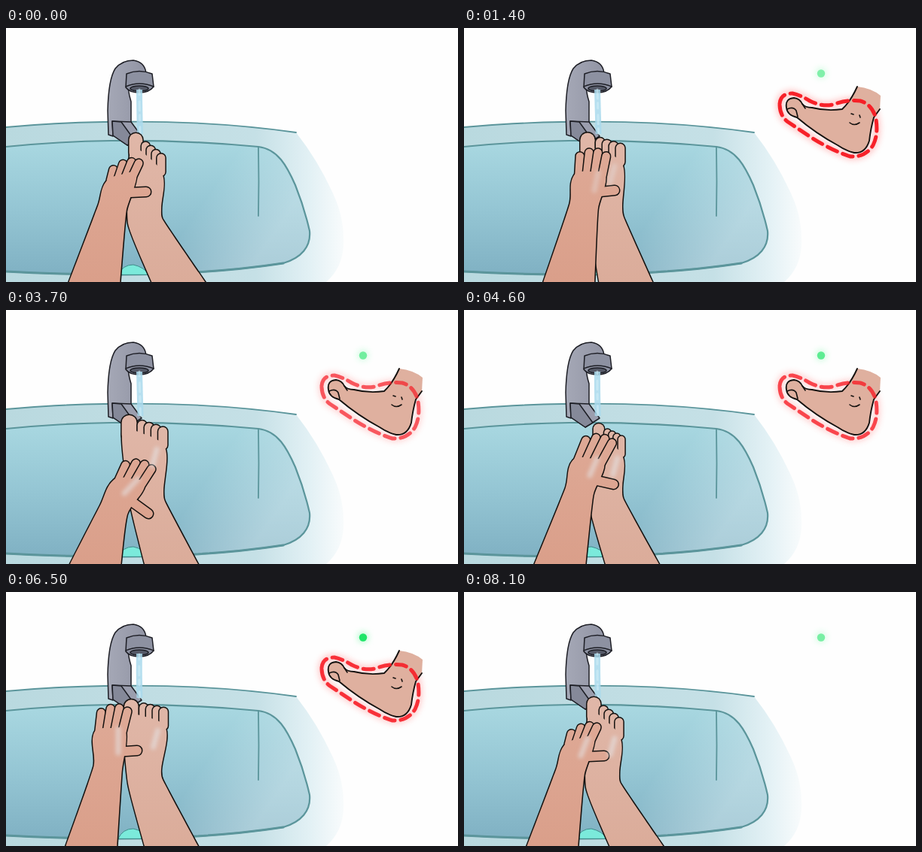
Animation, 600 px wide and 338 px high, one loop 8200 ms. Source, as an HTML page:

```html
<!DOCTYPE html>
<html lang="en">
<head>
<meta charset="utf-8">
<title>Foot washing</title>
<style>
  html, body { margin: 0; width: 100%; height: 100%; overflow: hidden; background: #fefefe; }
  svg { display: block; width: 100%; height: 100%; }
  path { stroke-linecap: round; stroke-linejoin: round; }
  .line { fill: none; stroke: #14110f; }
  .steel { stroke: #1d1e25; stroke-width: 1.5; }
  .edge { fill: none; stroke: #5b959b; }
</style>
</head>
<body>
<svg viewBox="0 0 600 338" preserveAspectRatio="none">
  <defs>
    <linearGradient id="water" x1="0" y1="0" x2="0" y2="1">
      <stop offset="0" stop-color="#a9d8e1"/>
      <stop offset=".5" stop-color="#95c6d4"/>
      <stop offset="1" stop-color="#80b1c3"/>
    </linearGradient>
    <linearGradient id="shine" x1="0" y1="0" x2="1" y2=".3">
      <stop offset=".72" stop-color="#eaf5f8" stop-opacity="0"/>
      <stop offset="1" stop-color="#eaf5f8" stop-opacity=".4"/>
    </linearGradient>
    <linearGradient id="rim" gradientUnits="userSpaceOnUse" x1="0" y1="0" x2="460" y2="0">
      <stop offset="0" stop-color="#b9d9df"/>
      <stop offset=".72" stop-color="#c5e0e6"/>
      <stop offset=".88" stop-color="#e3f1f5"/>
      <stop offset="1" stop-color="#fefefe"/>
    </linearGradient>
    <linearGradient id="handSkin" gradientUnits="userSpaceOnUse" x1="0" y1="130" x2="0" y2="338">
      <stop offset="0" stop-color="#dfab98"/>
      <stop offset="1" stop-color="#da9f8a"/>
    </linearGradient>
    <linearGradient id="footSkin" gradientUnits="userSpaceOnUse" x1="0" y1="140" x2="0" y2="338">
      <stop offset="0" stop-color="#e0b7a8"/>
      <stop offset="1" stop-color="#dbac9a"/>
    </linearGradient>
    <linearGradient id="steel" x1="0" y1="0" x2="1" y2="0">
      <stop offset="0" stop-color="#a5a8b6"/>
      <stop offset="1" stop-color="#9194a4"/>
    </linearGradient>
    <filter id="glow" x="-50%" y="-50%" width="200%" height="200%"><feGaussianBlur stdDeviation="4"/></filter>
    <filter id="foam" x="-100%" y="-100%" width="300%" height="300%"><feGaussianBlur stdDeviation="2.5"/></filter>
    <path id="bowl" d="M0 158Q70 151 140 150Q240 149 335 158C361 161 373 184 384 209Q396 239 403 270C405 291 392 306 368 313Q270 328 150 328Q70 328 0 324"/>
    <path id="ring" d="M419 101Q420 87 436 87Q446 89 459 97Q475 105 489 102Q509 95 526 97Q543 102 547 122Q550 142 543 156Q533 172 513 171Q488 163 460 145L430 125Q419 117 419 101Z"/>
  </defs>

  <g id="sink">
    <path fill="url(#rim)" d="M0 132Q65 126 130 125Q265 122 385 139Q414 176 434 220Q450 254 448 290Q446 320 425 338H0Z"/>
    <path class="edge" stroke-width="1.8" d="M0 132Q65 126 130 125Q265 122 385 139"/>
    <use href="#bowl" fill="url(#water)"/>
    <use href="#bowl" fill="url(#shine)"/>
    <use href="#bowl" class="edge" stroke-width="2.2"/>
    <path class="edge" stroke-width="3" d="M368 313Q270 328 150 328Q70 328 0 324"/>
    <path class="edge" stroke-width="1.8" d="M335 158Q336 205 335 250"/>
    <path fill="#7beadb" stroke="#3f8c8b" d="M149 328Q155 315 169 315Q183 318 190 328Z"/>
  </g>

  <g id="tap">
    <path class="steel" fill="url(#steel)" d="M136 142L135 110Q136 68 145 54Q154 43 169 43Q184 45 186 60L163 72Q161 82 166 98V126L142 144Z"/>
    <path class="steel" fill="#9b9eae" d="M141 124L166 125L180 144L161 156L142 143Z"/>
    <path class="steel" fill="#858999" d="M141 124L153 125L171 150L161 156L142 143Z"/>
    <path class="steel" fill="#8d91a1" d="M160 61Q177 54 194 61L196 78Q190 86 177 86Q164 86 159 79Z"/>
    <path class="steel" fill="none" d="M159 78Q177 70 196 78"/>
    <ellipse class="steel" cx="177" cy="80.5" rx="12" ry="3.5" fill="#565a68"/>
  </g>
  <path id="stream" fill="none" stroke="#a9d9ec" stroke-width="8" opacity=".85" style="stroke-linecap:butt"/>
  <path id="ripple" fill="none" stroke="#d3eef8" stroke-width="3" stroke-dasharray="7 9 12 6" opacity=".55"/>

  <g id="foot"></g>
  <g id="hand"></g>
  <path id="soap" fill="none" stroke="#e6eef3" stroke-width="7" filter="url(#foam)"/>

  <g id="icon">
    <use id="halo" href="#ring" fill="none" stroke="#ff5a5a" stroke-width="8" filter="url(#glow)"/>
    <path fill="#dfb09f" d="M428 106Q426 94 438 93Q446 94 449 101Q453 106 462 106Q482 111 502 108Q513 98 522 78Q541 80 553 90L552 108L544 119Q540 133 538 150Q533 167 518 166Q506 163 496 156Q468 141 442 119Q429 116 428 106Z"/>
    <path class="line" stroke-width="1.9" d="M522 78Q513 98 502 108Q482 111 462 106Q453 106 449 101Q446 94 438 93Q426 94 428 106Q429 116 442 119Q468 141 496 156Q506 163 518 166Q533 167 538 150Q540 133 544 119L552 108"/>
    <path class="line" stroke-width="1.6" d="M429 108Q437 104 441 110L443 118M449 101L453 107M512 126Q518 131 525 126M514 114L517 115M525 116L526 119"/>
    <use id="dashes" href="#ring" fill="none" stroke="#f71b24" stroke-width="5" stroke-dasharray="14 8" style="stroke-linecap:butt"/>
  </g>
  <g id="dot">
    <circle cx="474" cy="60" r="7" fill="#62f59a" opacity=".5" filter="url(#glow)"/>
    <circle cx="474" cy="60.5" r="5.2" fill="#1fe568"/>
  </g>
</svg>
<script>
const LOOP = 8200, STEP = 100, FLOOR = 342;
const el = id => document.getElementById(id);
const clamp = v => Math.max(0, Math.min(1, v));
const ramp = (t, a, b) => clamp((t - a) / (b - a));
const ease = u => (1 - Math.cos(Math.PI * u)) / 2;
const wave = (t, period, peak) => Math.cos((t - peak) / period * 2 * Math.PI);
const mix = (a, b, u) => Array.isArray(a) ? a.map((v, i) => mix(v, b[i], u)) : a + (b - a) * u;
const add = (p, d, k = 1) => [p[0] + d[0] * k, p[1] + d[1] * k];
const along = a => [Math.cos(a), Math.sin(a)];
const lean = a => [Math.sin(a), -Math.cos(a)];

// arm and leg: x where the limb leaves the stage; tilt: slope of the finger or toe row.
const grip = {
  hand: { arm: 117, wrist: [141, 240], palm: [154, 199], tilt: -.25, lean: .35, reach: 23, thumb: [186, 218] },
  foot: { leg: 231, ankle: [185, 255], ball: [187, 185], width: 27, tilt: .65 }
};
const keys = [
  { time: 0, ...grip },
  { time: 1400,
    hand: { arm: 139, wrist: [159, 238], palm: [168, 196], tilt: 0, lean: .13, reach: 33, thumb: [200, 216] },
    foot: { leg: 216, ankle: [189, 252], ball: [183, 179], width: 29, tilt: .28 } },
  { time: 2400,
    hand: { arm: 131, wrist: [147, 228], palm: [152, 180], tilt: .1, lean: .08, reach: 42, thumb: [192, 200] },
    foot: { leg: 218, ankle: [190, 256], ball: [193, 186], width: 21, tilt: .5 } },
  { time: 3700,
    hand: { arm: 118, wrist: [143, 266], palm: [165, 229], tilt: .15, lean: .5, reach: 30, thumb: [189, 271] },
    foot: { leg: 221, ankle: [188, 255], ball: [183, 180], width: 30, tilt: .3 } },
  { time: 5500,
    hand: { arm: 136, wrist: [163, 218], palm: [168, 175], tilt: .05, lean: .38, reach: 44, thumb: [208, 193] },
    foot: { leg: 229, ankle: [190, 250], ball: [201, 203], width: 13, tilt: .6 } },
  { time: 6500,
    hand: { arm: 113, wrist: [135, 236], palm: [139, 186], tilt: -.05, lean: .18, reach: 34, thumb: [174, 211] },
    foot: { leg: 221, ankle: [185, 250], ball: [185, 181], width: 28, tilt: .2 } },
  { time: 8100, ...grip }
];

const blend = (a, b, u) =>
  Object.fromEntries(Object.keys(a).map(k => [k, mix(a[k], b[k], u)]));

function poseAt(t) {
  const i = Math.max(1, keys.findIndex(k => k.time >= t));
  const a = keys[i - 1], b = keys[i];
  const raw = ramp(t, a.time, b.time), u = ease(ramp(raw, .15, .85));
  const hand = blend(a.hand, b.hand, u);
  const rub = 5 * Math.sin(4 * Math.PI * raw);
  for (const part of ["wrist", "palm", "thumb"])
    hand[part] = add(hand[part], [-.35, 1], rub);
  return { hand, foot: blend(a.foot, b.foot, u) };
}

// Smooth curve whose handles follow each segment's own length.
function curve(p) {
  const dir = p.map((_, i) => {
    const a = p[Math.max(0, i - 1)], b = p[Math.min(p.length - 1, i + 1)];
    const d = Math.hypot(b[0] - a[0], b[1] - a[1]) || 1;
    return [(b[0] - a[0]) / d, (b[1] - a[1]) / d];
  });
  return p.slice(1).reduce((d, b, i) => {
    const a = p[i], h = Math.min(14, Math.hypot(b[0] - a[0], b[1] - a[1]) * .36);
    return d + "C" + [...add(a, dir[i], h), ...add(b, dir[i + 1], -h), ...b].map(v => v.toFixed(1));
  }, "M" + p[0]);
}

// The body is filled last, so it hides the roots of the digits.
function drawLimb(id, body, digits) {
  const d = curve(body), skin = `url(#${id}Skin)`;
  const stroke = (path, colour, width) =>
    `<path d="${path}" fill="none" stroke="${colour}" stroke-width="${width}"/>`;
  el(id).innerHTML = stroke(d, "#14110f", 3) + digits.map(({ root, tip, width }) => {
    const path = `M${root}L${tip}`;
    return stroke(path, "#14110f", width + 3) + stroke(path, skin, width);
  }).join("") + `<path d="${d}Z" fill="${skin}"/>`;
}

function drawHand({ arm, wrist, palm, tilt, lean: angle, reach, thumb }) {
  const row = along(tilt), point = lean(angle);
  const across = along(Math.atan2(wrist[0] - arm, FLOOR - wrist[1]));
  const left = add(wrist, across, -19), right = add(wrist, across, 19);
  const body = [[arm - 35, FLOOR], left, add(palm, row, -22), add(palm, point, 5),
    add(palm, row, 20), right, [arm + 34, FLOOR]];
  const digits = [0, 1, 2, 3].map(i => {
    const s = i - 1.5;
    const root = add(palm, row, s * 10.4);
    const bow = 3 - 2.4 * s * s;
    return { root, tip: add(add(root, point, reach - 5 + bow), row, s * 1.2), width: 10.4 };
  });
  digits.push({ root: add(mix(wrist, palm, .45), row, 8), tip: thumb, width: 12 });
  drawLimb("hand", body, digits);
}

function drawFoot({ leg, ankle, ball, width, tilt }) {
  const row = along(tilt);
  const side = k => add(add(ball, row, width * k), [0, -8]);
  const body = [[leg - 36, FLOOR], add(ankle, [-23, 5]), side(-1), add(ball, [0, -15]),
    add(side(1), [0, 4]), add(ankle, [21, -14]), add(ankle, [23, 0]), [leg + 36, FLOOR]];
  const digits = [0, 1, 2, 3, 4].map(i => {
    const w = width * (i ? .4 : .66), s = i ? .32 * i - .4 : -.68;
    const root = add(ball, row, width * s);
    return { root: add(root, [0, -8]), tip: add(root, [0, w / 2 - 30 - (i ? 2 : 4)]), width: w };
  });
  drawLimb("foot", body, digits);
}

function drawSoap(t, { hand, foot }) {
  const top = add(foot.ball, along(foot.tilt), foot.width * .6);
  el("soap").setAttribute("d", curve([top, add(top, [-6, 22])])
    + curve([add(hand.wrist, [14, -22]), add(hand.palm, [10, -4])]));
  el("soap").style.opacity = .5 * ramp(t, 600, 1800);
}

function drawWater(t) {
  const n = t / STEP, sway = Math.sin(n * 2.4) * .7;
  const d = `M177 82Q${177 + sway} 105 ${178 + sway} 141`;
  el("stream").setAttribute("d", d);
  el("ripple").setAttribute("d", d);
  el("ripple").setAttribute("stroke-dashoffset", -n * 11);
}

function drawIcon(t) {
  const pulse = .83 + .17 * wave(t, 1000, 300);
  el("icon").style.opacity = ramp(t, 400, 900) * (1 - ramp(t, 7400, 8000));
  el("dashes").style.opacity = pulse;
  el("halo").style.opacity = pulse * .4;
  const blink = .8 + .2 * wave(t, 820, 2400);
  el("dot").style.opacity = blink * ramp(t, 1000, 1600) * (1 - .4 * ramp(t, 7700, 8100));
}

function render(now) {
  const t = Math.floor((now % LOOP) / STEP) * STEP;
  const pose = poseAt(t);
  drawWater(t);
  drawFoot(pose.foot);
  drawHand(pose.hand);
  drawSoap(t, pose);
  drawIcon(t);
}

const start = performance.now();
function tick() {
  render(performance.now() - start);
  requestAnimationFrame(tick);
}
tick();
</script>
</body>
</html>
```
